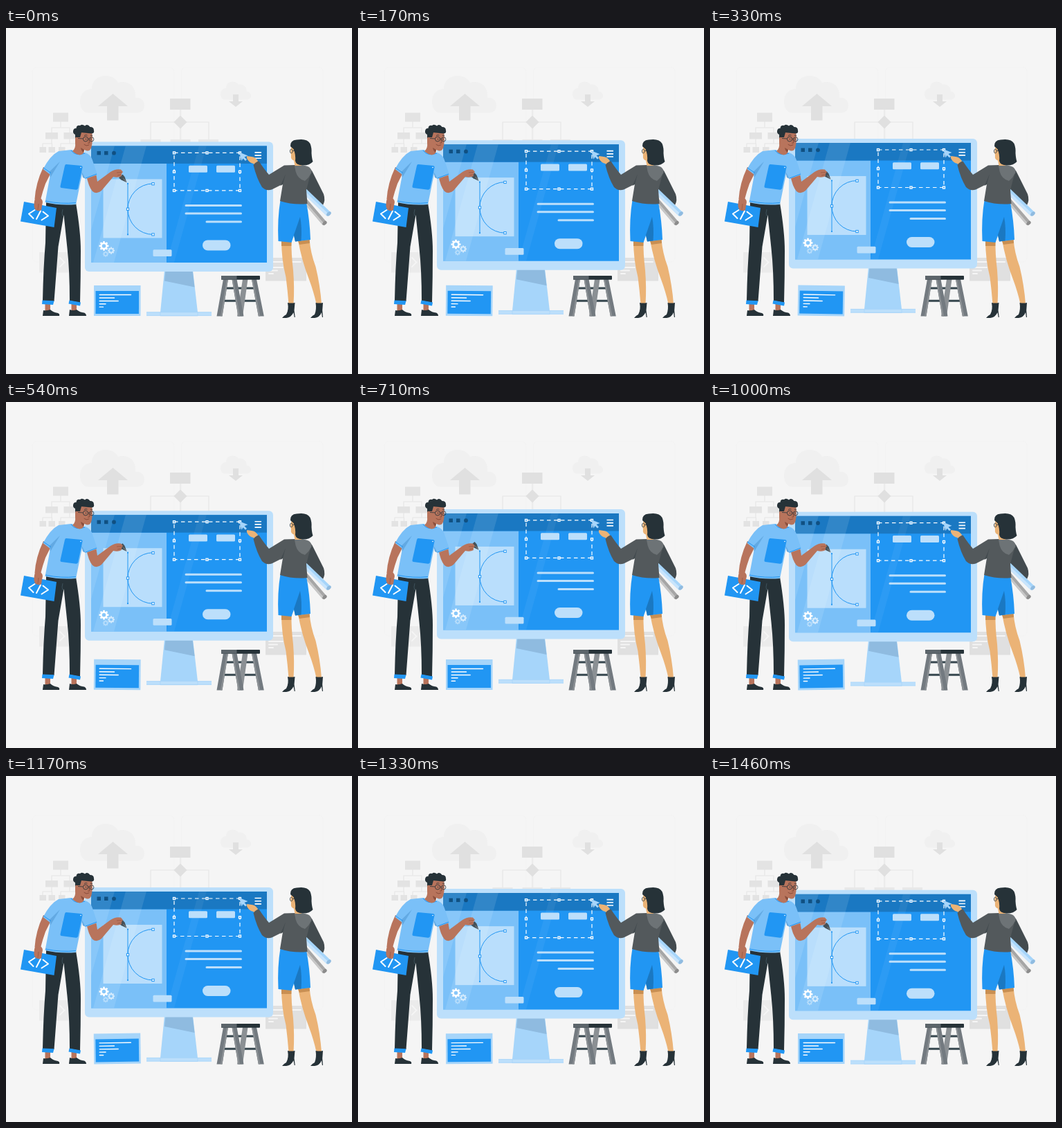
Recreate the animation shown at these times as an HTML page. Size 500 px wide and 500 px high, loop 1.5 s.

```html
<!DOCTYPE html>
<html lang="en">
<head>
<meta charset="utf-8">
<title>Web design illustration</title>
<style>
html, body { margin: 0; width: 100%; height: 100%; overflow: hidden; background: #f5f5f5; }
svg { display: block; width: 100vw; height: 100vh; }
.line { fill: none; stroke-linecap: round; stroke-linejoin: round; }
</style>
</head>
<body>
<svg viewBox="0 0 500 500">
  <defs>
    <clipPath id="screen"><rect x="123" y="170.500" width="254" height="168.500"/></clipPath>
  </defs>

  <g id="backdrop">
    <g fill="none" stroke="#ebebeb" stroke-width=".25">
      <rect x="38.200" y="57" width="204.500" height="281" rx="5.700"/>
      <rect x="253.500" y="57" width="204.500" height="281" rx="5.700"/>
    </g>
    <path fill="#f0f0f0" d="M119 122.500C111 122.500 107 115 107 106C107 96 114 88 124 88C124 77 132 69 144 69C152 69 159 73 162 79C175 75 187 83 187 97V101C195 100 200 105 200 112C200 118 196 122.500 190 122.500Z"/>
    <path fill="#e0e0e0" d="M154.500 95L176 113H162.500V133.500H146V113H133Z"/>
    <path fill="#f0f0f0" d="M316 103.500C312 103 309.500 99 310 94C310.500 90 314 87 318 87C318 81 322 77.500 327 77.500C331 77.500 334 79 336 82C342 80 348 85 348 92C352 92 354 95 354 98C354 102 351 103.500 347 103.500Z"/>
    <path fill="#e0e0e0" d="M328 96H336V106H342L332 114L322 106H328Z"/>
    <g fill="none" stroke="#e6e6e6" stroke-width="1.200">
      <path d="M252 118V162M209 162V136H293V162"/>
      <path d="M79 135V144M66 151V144H92V151M66 160V167M53 172V167H66.500V172M92 160V167M79 172V167H105V172"/>
    </g>
    <g fill="#e0e0e0">
      <path d="M237 102H266.500V118H237ZM252 126.500L261.500 136L252 145.500L242.500 136Z"/>
      <path fill="#e3e3e3" d="M68 122.500H90V135.500H68ZM57 151H75V160.500H57ZM83.500 151H101.500V160.500H83.500ZM48.500 172H58V180H48.500ZM61.500 172H71V180H61.500ZM76 172H85.500V180H76Z"/>
      <path fill="#e8e8e8" d="M194.500 161H223.500V176H194.500ZM237.500 161H266.500V176H237.500ZM278 161H307V176H278Z"/>
      <rect x="375" y="332" width="59" height="33.500"/>
    </g>
    <rect x="48" y="324" width="46" height="29.500" fill="#ebebeb"/>
    <path class="line" stroke="#f5f5f5" stroke-width="2" d="M78 332L84.500 338.500L78 345M380 338H426M380 346H400M380 350.500H392M380 355H386"/>
  </g>

  <g id="monitor">
    <rect x="203" y="410.500" width="94" height="5.500" fill="#bcdffb"/>
    <path fill="#a6d5fa" d="M229 350H270L277 411H223Z"/>
    <path fill="#8fbbe0" d="M230.500 350H269.500L272.500 374.500L229 365.500Z"/>
    <path stroke="#a6d5fa" stroke-width=".7" fill="none" d="M203 410.800H297M203 415.700H297M223 411V416H277V411"/>
    <rect x="114" y="164.500" width="272" height="187.500" rx="6" fill="#bcdffb"/>
    <g clip-path="url(#screen)">
      <rect x="123" y="170" width="254" height="170" fill="#2196f3"/>
      <rect x="123" y="196" width="109" height="144" fill="#fff" opacity=".4"/>
      <rect x="123" y="170" width="254" height="26" fill="#1a78c2"/>
      <path fill="#fff" opacity=".1" d="M123 170H157L123 292ZM173 170H203L156 339H126Z"/>
      <path fill="#fff" opacity=".05" d="M279 170H290L243 339H232Z"/>
    </g>
    <g fill="#105082">
      <rect x="131.500" y="178" width="5.500" height="5.500"/>
      <rect x="142" y="178" width="5.500" height="5.500"/>
      <circle cx="156" cy="180.800" r="2.900"/>
    </g>
    <path stroke="#fff" stroke-width="1.600" d="M359.500 180H369M359.500 184.200H369M359.500 188.400H369"/>

    <rect x="140.500" y="218.500" width="85" height="85" fill="#fff" opacity=".47"/>
    <path fill="none" stroke="#2196f3" d="M176 225V299M212.500 225A36.500 36.700 0 0 0 212.500 298.500"/>
    <circle cx="176" cy="225" r="1.100" fill="#2196f3"/>
    <circle cx="176" cy="298.500" r="1.100" fill="#2196f3"/>
    <g id="anchors" fill="#fff" stroke="#2196f3"></g>
    <g id="gears"></g>

    <rect x="243" y="180.500" width="95" height="54.500" fill="none" stroke="#fff" stroke-width="1.200" stroke-dasharray="5.500 4.500"/>
    <g id="handles" fill="#2196f3" stroke="#fff" stroke-width="1.300"></g>
    <g fill="#bcdffb">
      <rect x="264" y="198.800" width="27" height="10" rx="1.500"/>
      <rect x="304" y="198.800" width="27" height="10" rx="1.500"/>
      <rect x="284" y="306.500" width="40.500" height="15" rx="7.500"/>
      <rect x="212.500" y="320.300" width="27" height="9.700" rx="1.500"/>
    </g>
    <path class="line" stroke="#bcdffb" stroke-width="3" d="M260 256.500H339.500M260 268H339.500M290 280H339.500"/>
    <path fill="#a6d5fa" d="M337 179.500L349.500 184.500L344.500 186.500L348 190L346 192L342.500 188.500L340.500 192Z"/>
    <path fill="#455158" d="M163 216.500L168.500 211.500L171.500 215L174.500 223.300L166.500 219.500Z"/>
    <path stroke="#aab2b6" stroke-width=".6" d="M174 222.800L169.500 217.500"/>
  </g>

  <g id="window">
    <rect x="127" y="372" width="67.500" height="44" fill="#a6d5fa"/>
    <rect x="129.500" y="380" width="62.500" height="33" fill="#2196f3"/>
    <path class="line" stroke="#fff" stroke-width="1.400" d="M135.200 385.500H180.500M135.200 390H156.500M135.200 394.500H162.200M135.200 398.800H144M135.200 403.200H140.500"/>
  </g>

  <g id="stool">
    <path stroke="#37474f" stroke-width="3" d="M318 376H362M315 394.200H366"/>
    <path fill="#8b9094" d="M342 363H349.500L342 416.500H334Z"/>
    <path fill="#737a80" d="M314 363H321L312.500 416.500H304.500ZM326.500 363H333.500L343.500 416.500H335.500ZM355 363H362L372.800 416.500H364.800Z"/>
    <path fill="#8b9094" d="M319 363H321L312.500 416.500H310ZM326.500 363H328.500L338 416.500H335.500ZM355 363H357L367.500 416.500H364.800Z"/>
    <rect x="311" y="358" width="56" height="5.800" rx="1" fill="#263238"/>
    <path fill="#5c656b" d="M312 358H333.500V363.800H312Q311 363.800 311 363V359Q311 358 312 358Z"/>
  </g>

  <g id="man">
    <path fill="#b8745c" d="M56.500 398H64V410H56.500ZM94.500 398H102V410H94.500Z"/>
    <path fill="#263238" d="M54 408Q58 409 64 407Q68 411 75 412Q78 413 77 416H53ZM92 407Q97 409 102 407Q107 411 113 411.500Q116 413 116 416H91Z"/>
    <path fill="#263238" d="M58 252L101 253Q108 295 108 322Q108 360 107 397L92 394Q92 350 88.500 318L83.500 270L75.500 316L69.500 395L53 394Q54 345 57 310Z"/>
    <path fill="none" stroke="#455a64" stroke-width=".8" d="M82 262Q80 268 82 272"/>
    <path fill="#2196f3" d="M52.500 393.500L69.500 394.200L68 400L52 399ZM91.500 393.500L108 396.500L107 401.500L90.500 398.500Z"/>

    <path fill="#b8745c" d="M54 201L66 207L57 225Q53 236 50 248L41.500 247Q43 224 54 201Z"/>
    <path fill="#2196f3" d="M26 251L73 260L69.500 288L21 279.500Z"/>
    <path class="line" stroke="#fff" stroke-width="2" d="M41.500 263L33 268.500L39.500 275M50 264.500L44 276M53.500 265.500L61 271.500L51.500 277.500"/>
    <path fill="#b8745c" d="M42 246H50Q54 249 52.500 254L51 263Q47 266 42 262Q39 257 42 246Z"/>
    <path fill="none" stroke="#8a4e3c" stroke-width=".6" d="M47 254L46 263"/>

    <path fill="#b8745c" d="M116 212L130 210L132 222L151 208Q158 203 166 204.500L169 208Q166 211 167 214Q162 217 155 215L138 235Q131 241 125 236Q119 229 116 212Z"/>
    <path fill="none" stroke="#8a4e3c" stroke-width=".6" d="M160 209L167 208.500M161 213L166 212"/>
    <path fill="#7ac0f8" d="M94 176L114 180Q123 183 125 191L132 212L115 218L110 211L101 255Q78 257 56.500 252L64 212L53.500 204Q64 184 76 178Z"/>
    <path fill="#62a9e3" d="M78 193L64 216L62.500 208ZM109 207L115 218L111 216Z"/>
    <path fill="none" stroke="#2196f3" d="M57 250Q80 255 101 252.500M54 202L65 209.500M115 217L131 211M94 177Q101 186 114 181"/>
    <path fill="#2196f3" d="M87 197L109 199Q111 199.500 110.500 201.500L104 232Q103 234 101 233.700L80 231Q78 230.500 78.500 228.500L85 199Q85.500 197 87 197Z"/>
    <circle cx="108" cy="201.500" r=".8" fill="#fff"/>

    <path fill="#b8745c" d="M100 151L124 150Q126 162 123.500 172Q122 178 117 177.500L113 176L112 181Q106 187 96 178Q101 174 100 166Z"/>
    <path fill="#8a4e3c" d="M113 176L108 173Q109 178 112 180Z"/>
    <path fill="#263238" d="M100 154Q96 152 97.200 148Q98 144.500 101.500 145Q102 140 107 141Q110 138.500 114 141.500Q118 138 121.500 143Q127 143 127 148Q128 152 124 152.500L109 151L107 158H104L100 159Z"/>
    <path fill="#b8745c" d="M100.500 158Q104 157 104.500 161V165Q101 166 100.500 162Z"/>
    <g fill="none" stroke="#263238" stroke-width=".8">
      <circle cx="115" cy="160.500" r="3.500"/>
      <circle cx="123.800" cy="160.800" r="3.100"/>
      <path d="M104 159.500L111.500 160M118.500 160H120.700M113 155.500Q115 154 117.500 155M122 155.500Q124 154.500 125 155.500"/>
    </g>
    <circle cx="115.500" cy="160.500" r=".7" fill="#263238"/>
    <circle cx="123" cy="160.500" r=".7" fill="#263238"/>
    <path class="line" stroke="#7c4030" stroke-width=".8" d="M119.500 161L121 166L118.500 166.200M113 168.500Q116 171.500 120 169"/>
  </g>

  <g id="woman">
    <path fill="#ebb376" d="M398 306H412.500Q412 325 415 350Q417 375 415.500 399H408.500Q407 380 404.500 360Q398 335 398 306ZM422 306L438.500 305Q440 325 447.500 345Q454 372 456 399H448.500Q445 382 437.500 362Q427 335 422 306Z"/>
    <path fill="#c98f52" d="M398 308H412.500L412.300 315H398ZM422 308L438.500 306L439 311L424 313Z"/>
    <path fill="#263238" d="M407 397Q412 398 417.500 397L416.500 408L417.800 418H416.700L415.500 411Q412 418.500 405 419H399Q401 416 405 414Q409 407 407 397ZM447.500 397Q453 398 458 397L457.200 408L458 418H456.900L456 411Q453 418.500 446 419H440Q442 416 446 414Q449 407 447.500 397Z"/>

    <path fill="#434b4f" d="M434 201Q442 204 444 210L459 240Q462 249 458 256L434 236Z"/>
    <path stroke="#a6a6a6" stroke-width="7" d="M430 247L460.500 282.500"/>
    <path stroke="#c7c7c7" stroke-width="3" d="M428.500 248.500L458.500 283.500"/>
    <ellipse cx="460.500" cy="282" rx="3.600" ry="2.400" transform="rotate(-40 460.500 282)" fill="#8c8c8c"/>
    <path stroke="#a6d5fa" stroke-width="7.500" d="M430 234L466.500 269"/>
    <path stroke="#c8e4fc" stroke-width="4" d="M428.500 235.500L464.500 270"/>
    <ellipse cx="466.500" cy="268.500" rx="3.800" ry="2.500" transform="rotate(-44 466.500 268.500)" fill="#8fbbe0"/>

    <path fill="#2196f3" d="M396.500 249L434 252Q439 278 440 306L418 308.500L416 300L412.500 310L393.500 308Q392 275 396.500 249Z"/>
    <path fill="#1a78c2" d="M425 273L416 299L418 308.500L426.500 307.500Q428 288 425 273Z"/>
    <path fill="#ebb376" d="M364 192Q360 186 355 186L348.500 185Q347 187 349 190Q352 195 357.500 196L361 199Z"/>
    <path fill="#53595c" d="M418 198L402 198.500L380 212Q373 204 365.500 192.500Q361 193 357.500 198Q362 217 370 230Q376 236 384 233.500L400 225.500L396 250Q415 256 435.500 254L434 234L441 208Q437 200 428 199Z"/>
    <path fill="#434b4f" d="M404 211L400 226L396.500 228Q401 219 404 211Z"/>
    <path fill="#6d7376" d="M417 199Q430 197 438 201Q442 204 441.500 209Q438 216 432 221Q421 218 418.500 207Z"/>

    <path fill="#ebb376" d="M413 170Q410.500 178 412 184Q411 190 416 191.500L417.500 199H427V170Z"/>
    <path fill="#263238" d="M411 171Q410.500 162 420 161.500Q435 159 439.500 167Q442 173 441.500 181Q442 189 443.500 193Q439 198.500 429 198.500Q419 198 418 192Q419 183 415.500 175Z"/>
    <ellipse cx="412.300" cy="178" rx="2" ry="2.800" fill="none" stroke="#263238" stroke-width=".7"/>
    <path stroke="#263238" stroke-width=".7" d="M414 177.500H418"/>
  </g>
</svg>
<script>
const LOOP = 1500;
const LEAD = 35;
const $ = id => document.getElementById(id);

const box = (x, y, s) =>
  `<rect x="${x - s / 2}" y="${y - s / 2}" width="${s}" height="${s}"/>`;

function gear(x, y, r, opacity) {
  const teeth = Array.from({ length: 8 }, (_, i) =>
    `<path d="M0 ${-r * .75}V${-r * 1.15}" transform="rotate(${i * 45})"/>`).join('');
  return `<g transform="translate(${x} ${y})" fill="none" stroke="#fff" opacity="${opacity}" stroke-width="${r * .42}">
    <circle r="${r * .67}"/>${teeth}</g>`;
}

$('anchors').innerHTML =
  [[212.5, 225.3], [176, 261.8], [212.5, 298.5]].map(p => box(...p, 3.3)).join('');

const cols = [243, 290.5, 338];
const rows = [180.5, 207.8, 235];
$('handles').innerHTML = rows.map((y, j) =>
  cols.map((x, i) => i === 1 && j === 1 ? '' : box(x, y, 3)).join('')).join('');

$('gears').innerHTML =
  gear(141.5, 315, 6, 1) + gear(152, 321.7, 4.4, .65) + gear(144, 326.7, 3.6, .4);

// Triangle wave: 0 at the ends of the loop, 1 in the middle
const lift = p => 1 - Math.abs(2 * p - 1);

// Linear sway: 0, 1 at a quarter, -1 at three quarters, 0
const sway = p => p < .25 ? 4 * p : p < .75 ? 2 - 4 * p : 4 * p - 4;

function draw(ms) {
  const p = ((ms + LEAD) % LOOP) / LOOP;
  $('monitor').setAttribute('transform', `translate(0 ${.4 - 10 * lift(p)})`);
  $('window').setAttribute('transform', `rotate(${sway(p)} 160.75 394)`);
}

const start = performance.now();
function tick() {
  draw(performance.now() - start);
  requestAnimationFrame(tick);
}
tick();
</script>
</body>
</html>
```
